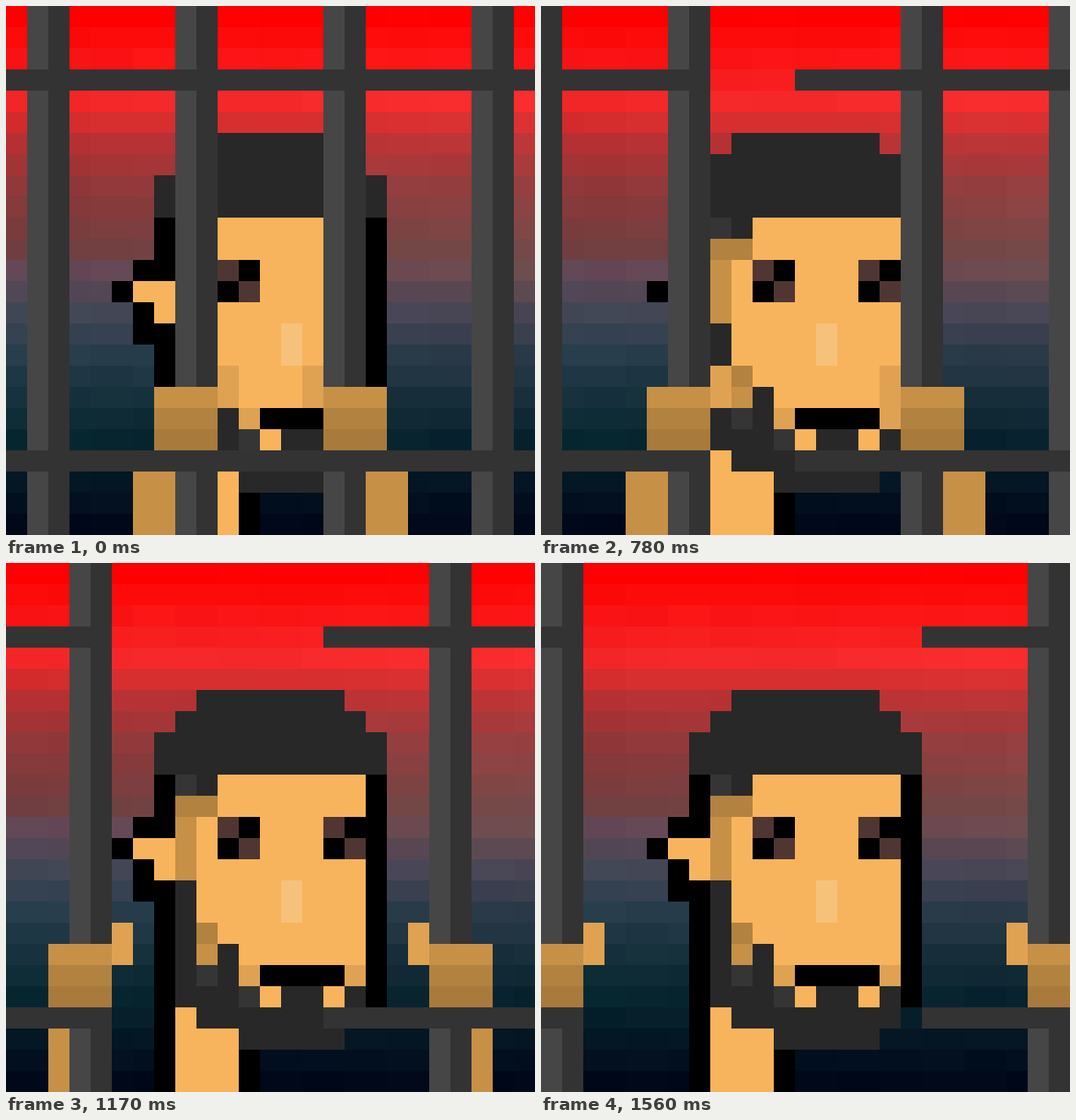
Recreate the animation shown at these times as an HTML page with a canvas. Size 600 px wide and 600 px high, loop 2600 ms.

```html
<!DOCTYPE html>
<html lang="en">
<head>
<meta charset="utf-8">
<title>Bars opening</title>
<style>
  html, body { margin: 0; width: 100%; height: 100%; overflow: hidden; background: #000819; }
  canvas { display: block; width: 100vw; height: 100vh; }
</style>
</head>
<body>
<canvas id="stage" width="600" height="600"></canvas>
<script>
const CELL = 24, GRID = 25;
const LOOP = 2600, START = 520, STEP = 130, LAST = 8;

const SKIN = '#f8b45c', SHADE = '#c69047', DEEP = '#b28240', SOFT = '#dfa253';
const HAIR = '#282828', GREY = '#353536', BROWN = '#4f3632', BLACK = '#000';
const IRON = '#333', SHINE = '#464646';

// Sky colours at a few rows: left edge, right edge
const SKY = [
  [0, 'ff0000', 'ff0000'],
  [4, 'f42728', 'fa2c2d'],
  [6, 'b43032', 'bc3638'],
  [8, '903839', '964041'],
  [11, '703e40', '754a49'],
  [12, '624757', '6d4c4d'],
  [14, '424756', '4a4555'],
  [16, '263d4b', '2b3a48'],
  [20, '06262f', '07212d'],
  [24, '000819', '000819']
];

const stage = document.getElementById('stage').getContext('2d');
const scene = document.createElement('canvas');
scene.width = scene.height = CELL * GRID;
const back = scene.getContext('2d');

// Fill a block given in cells
function block(c, color, x, y, w = 1, h = 1) {
  c.fillStyle = color;
  c.fillRect(x * CELL, y * CELL, w * CELL, h * CELL);
}

function random(seed) {
  return () => (seed = seed * 16807 % 2147483647) / 2147483647;
}

const rgb = hex => [0, 2, 4].map(i => parseInt(hex.slice(i, i + 2), 16));
const mix = (a, b, t) => a.map((v, i) => v + (b[i] - v) * t);

function skyRow(y) {
  const i = Math.max(1, SKY.findIndex(key => key[0] >= y));
  const [from, to] = [SKY[i - 1], SKY[i]];
  const t = (y - from[0]) / (to[0] - from[0]);
  return [1, 2].map(side => mix(rgb(from[side]), rgb(to[side]), t));
}

function drawSky() {
  const rnd = random(77);
  for (let y = 0; y < GRID; y++) {
    const [left, right] = skyRow(y);
    for (let x = 0; x < GRID; x += 2) {
      const noise = (rnd() - .5) * 3;
      const color = mix(left, right, x / GRID).map(v => Math.round(v + noise));
      block(back, `rgb(${color})`, x, y, 2);
    }
  }
}

function drawEye(x, y) {
  for (let i = 0; i < 4; i++) {
    const col = i % 2, row = i >> 1;
    block(back, col === row ? BROWN : BLACK, x + col, y + row);
  }
}

function drawHead() {
  const put = (...args) => block(back, ...args);
  // outline and neck
  put(BLACK, 7, 10, 1, 15);
  put(BLACK, 17, 10, 1, 11);
  put(BLACK, 11, 23, 1, 2);
  put(SKIN, 8, 21, 3, 4);
  put(BLACK, 8, 22 + 3, 1);
  // ear
  put(BLACK, 6, 12, 1, 4);
  put(BLACK, 5, 13);
  put(SKIN, 6, 13, 2);
  put(SKIN, 7, 14);
  // face
  put(SKIN, 8, 10, 9, 10);
  put(SHADE, 8, 11, 1, 4);
  put(DEEP, 8, 11, 2);
  // cap of hair, one cell wider per row
  for (let y = 6; y < 10; y++) {
    const inset = Math.max(0, 8 - y);
    put(HAIR, 7 + inset, y, 11 - 2 * inset);
  }
  put(GREY, 8, 10);
  put(HAIR, 9, 10);
  // beard
  put(HAIR, 8, 15, 1, 6);
  put(HAIR, 10, 18, 1, 2);
  put(HAIR, 9, 20, 8, 2);
  put(HAIR, 11, 22, 5);
  put(GREY, 9, 19);
  put(GREY, 11, 20);
  put(DEEP, 9, 17);
  put(SHADE, 9, 18);
  // eyes, nose, mouth
  drawEye(10, 12);
  drawEye(15, 12);
  put('#f6c17b', 13, 15, 1, 2);
  put(BLACK, 12, 19, 4);
  for (const x of [11, 16]) put(SOFT, x, 19);
  for (const x of [12, 15]) put(SKIN, x, 20);
}

function drawHand(x, armX, armW, fingerX) {
  [SHADE, DEEP, '#a87a3b'].forEach((color, i) => block(stage, color, x, 18 + i, 3));
  block(stage, SHADE, armX, 22, armW, 3);
  block(stage, SOFT, fingerX, 17, 1, 2);
}

// k: how many cells each half of the gate has moved outwards
function drawGate(k) {
  const left = 8 - k, right = 15 + k;
  for (const x of [left - 7, left, right, right + 7]) {
    block(stage, SHINE, x, 0, 1, GRID);
    block(stage, IRON, x + 1, 0, 1, GRID);
  }
  for (const y of [3, 21]) {
    block(stage, IRON, 0, y, left + 2);
    block(stage, IRON, right - 5, y, GRID);
  }
  const arm = k < 5 ? 2 : 1;
  drawHand(left - 1, left - arm, arm, left + 2);
  drawHand(right, right + 2, arm, right - 1);
}

const begin = performance.now();
function tick() {
  const t = (performance.now() - begin) % LOOP;
  const k = Math.max(0, Math.min(LAST, Math.floor((t - START) / STEP)));
  stage.drawImage(scene, 0, 0);
  drawGate(k);
  requestAnimationFrame(tick);
}

drawSky();
drawHead();
tick();
</script>
</body>
</html>
```
